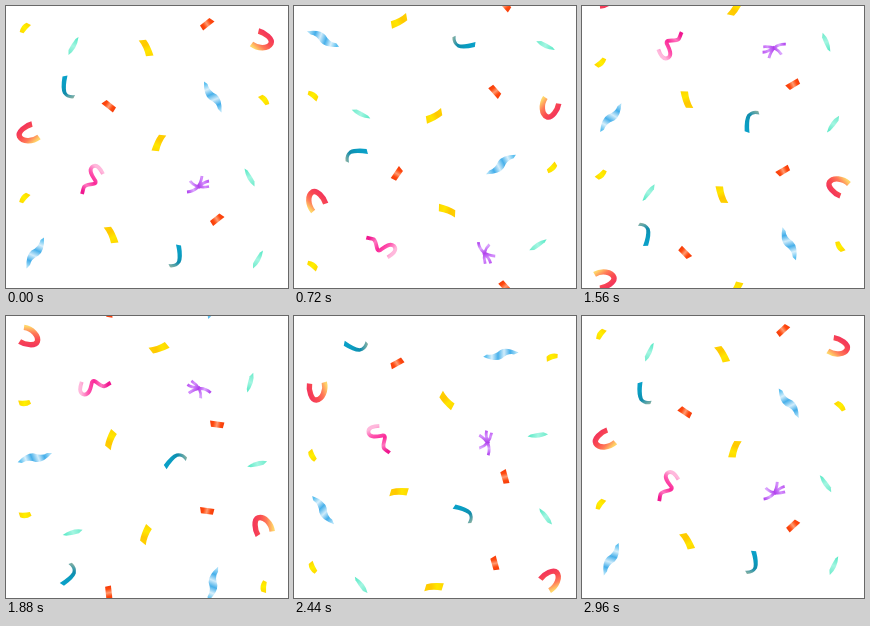
An HTML page with a canvas that plays this animation: 282x282 px, repeating every 3 s.

```html
<!DOCTYPE html>
<html lang="en">
<head>
<meta charset="utf-8">
<title>Confetti</title>
<style>
html, body { margin: 0; width: 100%; height: 100%; overflow: hidden; background: #fff; }
canvas { display: block; width: 282px; height: 282px; }
</style>
</head>
<body>
<canvas id="stage"></canvas>
<script>
const SIZE = 282, LOOP = 3000, STEP = 40;
const canvas = document.getElementById('stage');
const ctx = canvas.getContext('2d');
const ratio = window.devicePixelRatio || 1;
canvas.width = canvas.height = Math.round(SIZE * ratio);

// Evenly spaced colours along the line (x0,y0)-(x1,y1)
function blend(line, colors) {
  const g = ctx.createLinearGradient(...line);
  colors.forEach((c, i) => g.addColorStop(i / (colors.length - 1), c));
  return g;
}

// A width makes a stroked ribbon, otherwise the path is filled
function shape(d, line, colors, width) {
  return { path: new Path2D(d), paint: blend(line, colors), width };
}

const shapes = {
  chip: shape('M-6 -3 L-1.5 -5.3 Q4 -3 5.3 4 L1.5 5.3 Q-1 1.5 -6 -3Z',
    [-4, -4, 4, 4], ['#ffd800', '#fff000', '#ffdc00']),
  strip: shape('M-7.3 -7.5 L0 -8.3 Q4 -3 7.5 7.5 L0 8.2 Q-2 -1 -7.3 -7.5Z',
    [-4, -8, 4, 8], ['#ffd000', '#ffc800', '#ffe600', '#ffd800']),
  brick: shape('M3.9 6.5 L-7.5 -2.4 L-2.4 -6.1 L7 1.4Z',
    [-6, -4, 6, 4], ['#f83c08', '#ff4a10', '#ff9a70', '#ff4a10', '#f23a08']),
  leaf: shape('M-5.5 -9 L-2.5 -7 Q2 -1 4.5 4 L4.5 9 Q-4 3 -5.5 -9Z',
    [-4, -9, 4, 9], ['#54e8c4', '#a4f6e2', '#6ceaca']),
  hook: shape('M-5.5 -11 L-.5 -12 Q-3 -1 -1.7 4.5 Q0 8.5 7 7.5 L5.5 10.8 Q-1 11.5 -5 6 Q-7.5 1 -5.5 -11Z',
    [-4, -10, 5, 11], ['#0aa0c8', '#0a9cc0', '#108cac', '#90b4a4']),
  curl: shape('M-3.5 -9 C3 -7.5 11 -1 9 3.5 C6 9 -4 9 -10.5 4',
    [3, -8, -10, 6], ['#f4385a', '#fa4c50', '#ff7a58', '#ffd468'], 5.4),
  wave: shape('M-9 -15.5 L-5.5 -13 Q-4 -6 3.5 -2.5 Q9.5 2 8.5 15.5 L5 12 Q4 6 -3.5 2.5 Q-9.5 -2 -9 -15.5Z',
    [-6, -14, 6, 14], ['#5cc0f0', '#d8f0fc', '#48b0ea', '#d0ecfb', '#44aeea', '#a8def8']),
  swirl: shape('M10 -6 C8 -10 4 -17 -1 -13 C-5 -9 0 -3 2.5 1 C4 6 -6 3 -9 7 C-10 9 -10 11 -11 14',
    [9, -8, -9, 12], ['#ffb8dc', '#ff58b0', '#fa2898', '#ff78c0', '#f01890'], 3.8),
  star: shape('M-11 7 Q2 6 4 -9 M-8 -4 Q-2 4 11 1.5 M0 3 Q5 -3 11 -4',
    [-11, 4, 11, -4], ['#b44cf0', '#dca8ff', '#b040ec', '#d490fc', '#bc54f2'], 2.8)
};

// kind, x, y, mirrored
const pieces = [
  ['chip', 19, 22, 1], ['chip', 258, 94], ['chip', 18.5, 192, 1],
  ['strip', 140, 42], ['strip', 105, 229], ['strip', 153, 137, 1],
  ['brick', 201, 18, 1], ['brick', 103, 100], ['brick', 211, 213.5, 1],
  ['leaf', 67, 40, 1], ['leaf', 244, 171.5], ['leaf', 251.5, 253.5, 1],
  ['hook', 62, 81.5], ['hook', 169.5, 250.5, 1],
  ['curl', 256, 34], ['curl', 22.5, 127, 1],
  ['wave', 207, 91], ['wave', 29, 247, 1],
  ['swirl', 87, 174], ['star', 192, 179]
];

function drawPiece(kind, x, y, flip, turn) {
  const s = shapes[kind];
  ctx.save();
  ctx.translate(x, y);
  ctx.rotate(turn);
  if (flip) ctx.scale(-1, 1);
  if (s.width) {
    ctx.lineWidth = s.width;
    ctx.strokeStyle = s.paint;
    ctx.stroke(s.path);
  } else {
    ctx.fillStyle = s.paint;
    ctx.fill(s.path);
  }
  ctx.restore();
}

const start = performance.now();

function frame(now) {
  const ms = Math.max(0, now - start) % LOOP;
  const p = Math.floor(ms / STEP) * STEP / LOOP;
  ctx.setTransform(ratio, 0, 0, ratio, 0, 0);
  ctx.fillStyle = '#fff';
  ctx.fillRect(0, 0, SIZE, SIZE);
  for (const [kind, x, y, flip] of pieces) {
    const fall = (y + p * SIZE) % SIZE;
    // Neighbouring copies keep the wrap at the edges seamless
    for (const shift of [-SIZE, 0, SIZE]) {
      drawPiece(kind, x, fall + shift, flip, p * 2 * Math.PI);
    }
  }
  requestAnimationFrame(frame);
}
frame(start);
</script>
</body>
</html>
```
